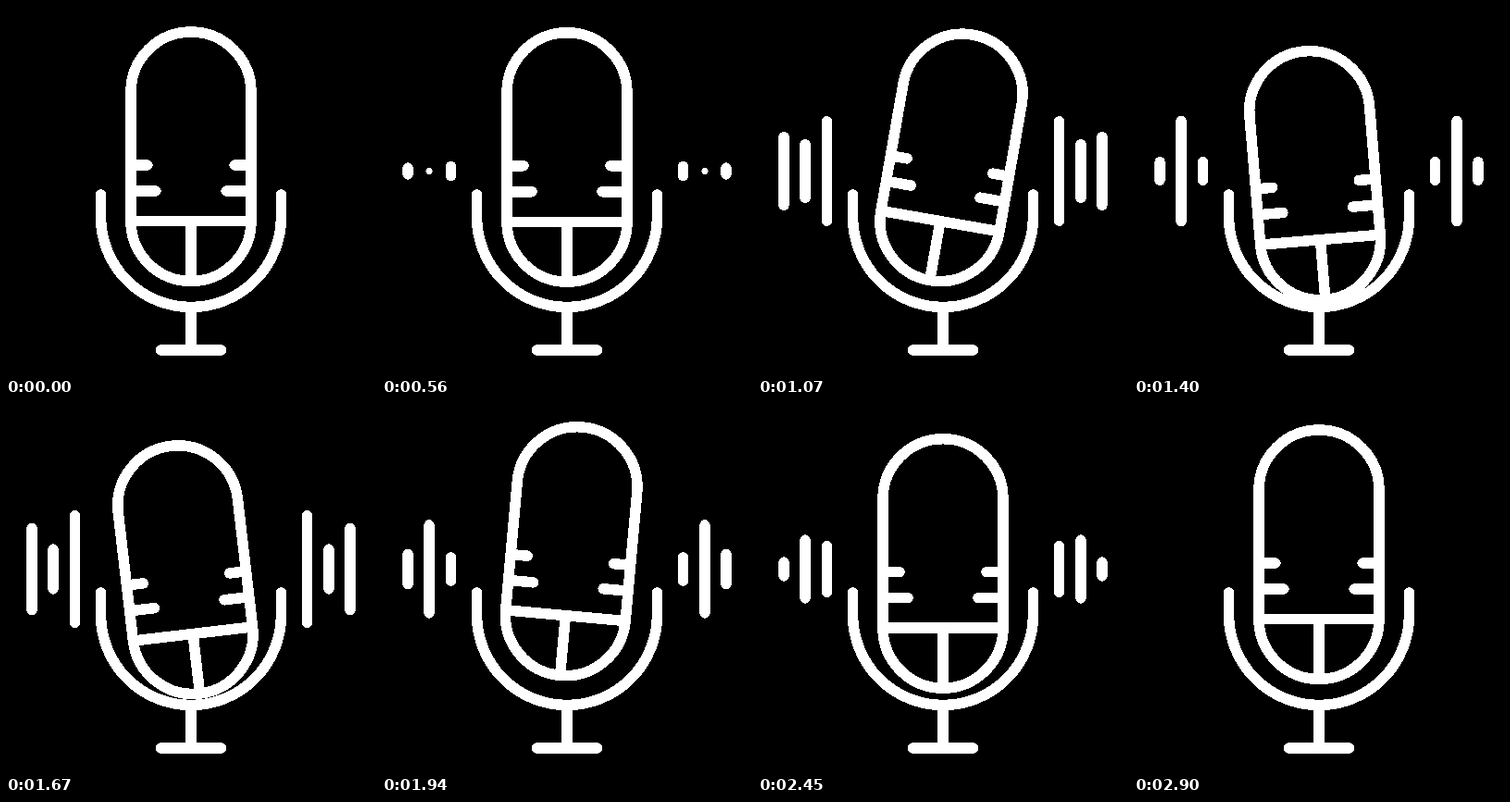
Animation, 400 px wide and 400 px high, one loop 2.93 s. Source, as an HTML page:

```html
<!DOCTYPE html>
<html>
<head>
<meta charset="utf-8">
<style>
html, body { margin: 0; width: 100%; height: 100%; overflow: hidden; background: #000; }
svg { display: block; width: 100vw; height: 100vh; }
</style>
</head>
<body>
<svg viewBox="0 0 400 400" fill="none" stroke="#fff" stroke-width="11.5" stroke-linecap="round" shape-rendering="crispEdges">
  <path d="M102.5 204V228A97.5 97.5 0 0 0 297.5 228V204M200 326V372M167.5 372H232.5"/>
  <g id="mic">
    <rect x="135" y="28" width="130" height="269.5" rx="65"/>
    <path d="M135 172H153M135 200H162M265 172H247M265 200H238M135 232.5H265M200 232.5V297"/>
  </g>
  <g id="bars"></g>
</svg>
<script>
const START = 530, STEP = 30, LOOP = 2930, BEAT = 570, SWING = 25, MIDDLE = 178.5;

// Turning points of the bounce and the sway: time, value
const lift = [[530, 0], [815, 28], [1190, -8], [1460, 24], [2100, -8.5], [2480, 10], [2900, 0]];
const tilt = [[680, 0], [1090, 10], [1540, -9], [2070, 7.5], [2450, 0]];

const waves = [
  { x: 28, mean: 34, peak: 1181, fade: 1990 },
  { x: 51, mean: 42, peak: 1470, fade: 2500 },
  { x: 74.4, mean: 40, peak: 1132, fade: 2500 }
];

const clamp = v => Math.max(0, Math.min(1, v));
const ease = p => (1 - Math.cos(Math.PI * clamp(p))) / 2;

// Each key adds its eased change to the value before it
function sample(keys, t) {
  return keys.slice(1).reduce((sum, [end, value], i) => {
    const [begin, from] = keys[i];
    return sum + (value - from) * ease((t - begin) / (end - begin));
  }, keys[0][1]);
}

const mic = document.getElementById("mic");
const group = document.getElementById("bars");
const bars = waves.map(() =>
  group.appendChild(document.createElementNS("http://www.w3.org/2000/svg", "path")));

function drawBar({ x, mean, peak, fade }, path, t) {
  const size = clamp((t - START) / 180) * clamp((2700 - t) / (2700 - fade));
  const half = size * (mean + SWING * Math.cos((t - peak) / BEAT * 2 * Math.PI));
  const cap = Math.min(5.75, half), h = Math.max(0.01, half - cap);
  path.setAttribute("stroke-width", 2 * cap);
  path.setAttribute("d", [x, 400 - x].map(v => `M${v} ${MIDDLE - h}v${2 * h}`).join(""));
}

function draw(now) {
  const t = START + Math.floor((now % LOOP - START) / STEP) * STEP;
  mic.setAttribute("transform", `translate(0 ${sample(lift, t)}) rotate(${sample(tilt, t)} 200 215)`);
  waves.forEach((wave, i) => drawBar(wave, bars[i], t));
}

const begin = performance.now();
function frame() {
  draw(performance.now() - begin);
  requestAnimationFrame(frame);
}
frame();
</script>
</body>
</html>
```
